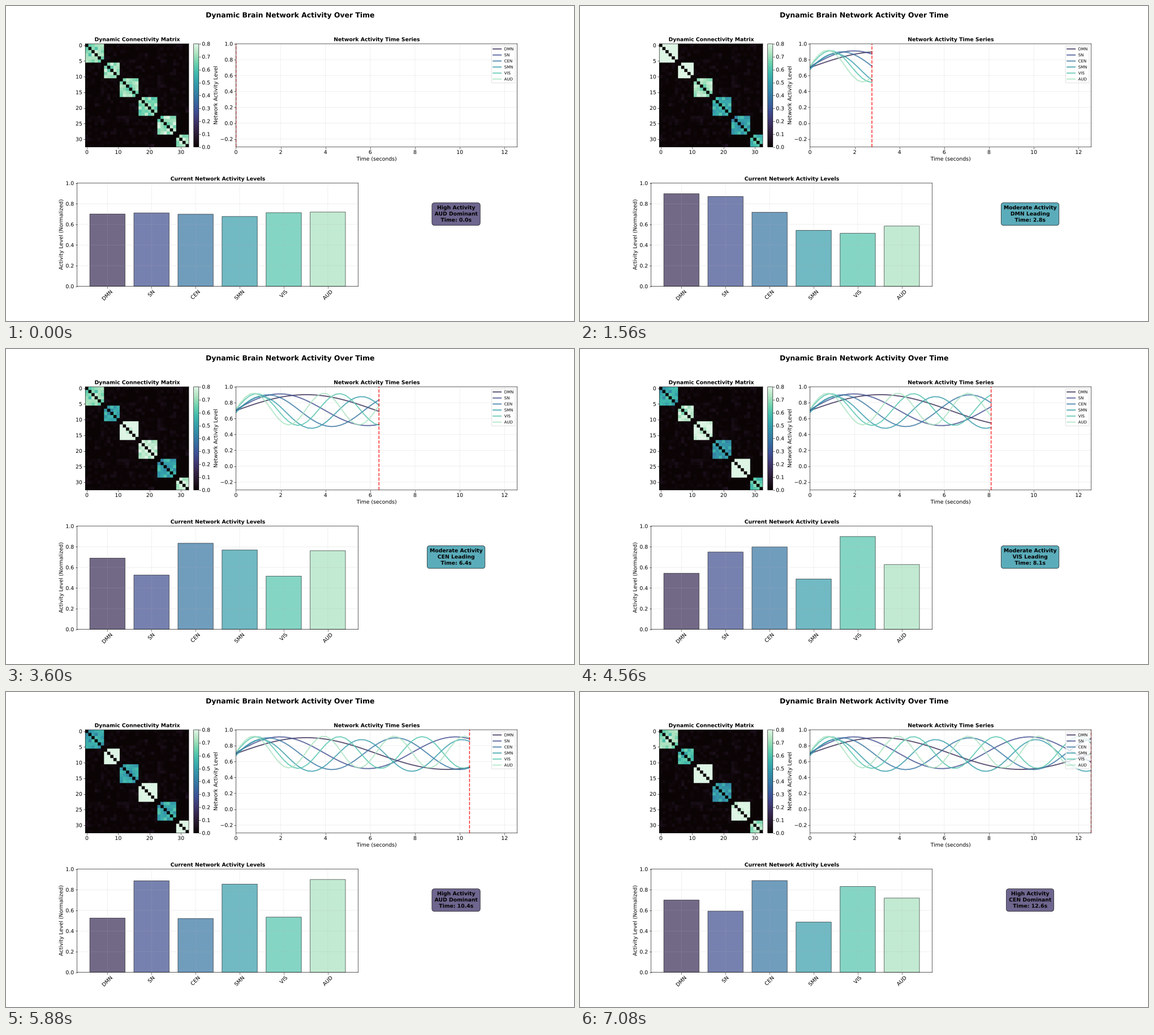
A matplotlib script that plays this animation: 1004x558 px, repeating every 7200 ms.

```python
import numpy as np
import matplotlib.pyplot as plt
from matplotlib.animation import FuncAnimation
from matplotlib.colors import LinearSegmentedColormap
from matplotlib.patheffects import Normal
from matplotlib.text import Text

FRAMES, INTERVAL = 60, 120
NAMES = ["DMN", "SN", "CEN", "SMN", "VIS", "AUD"]
SIZES = [6, 5, 6, 6, 6, 4]
MEANS = np.array([0.701, 0.711, 0.699, 0.677, 0.714, 0.720])
HIGH, MODERATE = "#6e668e", "#5bacba"
UPSAMPLE = np.ones((12, 12))

# Place edges and glyphs at fractions of a pixel.
plt.rcParams.update({"font.family": "DejaVu Sans", "font.size": 12,
                     "text.hinting": "none", "path.snap": False})
mako = LinearSegmentedColormap.from_list("mako", [
    "#0B0405", "#231526", "#35264C", "#403A75", "#3D5296", "#366DA0",
    "#3487A6", "#35A1AB", "#43BBAD", "#6CD3AD", "#ADE3C0", "#DEF5E5"])
colors = mako(np.linspace(0.2, 0.9, len(NAMES)))

# Network means oscillate, each one faster than the last.
t = np.linspace(0, 4 * np.pi, FRAMES)
waves = 0.2 * np.sin(np.outer(0.5 + 0.3 * np.arange(len(NAMES)), t))
activity = MEANS[:, None] + waves

# Symmetric matrix: faint background noise, strong blocks, empty diagonal.
rng = np.random.default_rng(42)
labels = np.repeat(np.arange(len(SIZES)), SIZES)
n = len(labels)


def symmetric(values):
    return (values + values.T) / 2


base = np.clip(symmetric(rng.normal(0, 0.03, (n, n))), 0, None)
strength = symmetric(rng.uniform(0.6, 0.8, (n, n)))
np.fill_diagonal(base, 0)
off_diagonal = ~np.eye(n, dtype=bool)
blocks = []
for k, mean in enumerate(MEANS):
    block = (labels[:, None] == k) & (labels == k) & off_diagonal
    base[block] = strength[block] - strength[block].mean() + mean
    blocks.append(block)


def matrix_at(frame):
    matrix = base.copy()
    for block, wave in zip(blocks, waves[:, frame]):
        matrix[block] += wave
    return np.kron(matrix, UPSAMPLE)


def set_title(ax, text):
    ax.set_title(text, fontsize=12, fontweight="bold")


fig = plt.figure(figsize=(17.9929, 10), dpi=55.8)
fig.suptitle("Dynamic Brain Network Activity Over Time", fontsize=16,
             fontweight="bold")
grid = fig.add_gridspec(2, 3, left=0.125, right=0.9, bottom=0.11, top=0.88,
                        hspace=0.35, wspace=0.3)

ax_matrix = fig.add_subplot(grid[0, 0])
image = ax_matrix.imshow(matrix_at(0), cmap=mako, vmin=0, vmax=0.8,
                         extent=(-0.5, n - 0.5, n - 0.5, -0.5),
                         interpolation="hanning", interpolation_stage="rgba")
ax_matrix.set_xticks(range(0, 31, 10))
ax_matrix.set_yticks(range(0, 31, 5))
set_title(ax_matrix, "Dynamic Connectivity Matrix")
fig.colorbar(image, ax=ax_matrix, fraction=0.046, pad=0.04,
             ticks=np.arange(9) / 10)

ax_series = fig.add_subplot(grid[0, 1:])
lines = [ax_series.plot([], [], color=c, lw=2.5, alpha=0.8, label=name)[0]
         for name, c in zip(NAMES, colors)]
cursor = ax_series.axvline(0, color="red", ls="--", lw=2, alpha=0.8)
ax_series.set(xlim=(0, t[-1]), ylim=(-0.3, 1), xlabel="Time (seconds)",
              ylabel="Network Activity Level", xticks=range(0, 13, 2),
              yticks=np.arange(-1, 6) / 5)
set_title(ax_series, "Network Activity Time Series")
ax_series.legend(loc="upper right", fontsize=9, labelspacing=0.56)
ax_series.grid(alpha=0.3)

ax_bars = fig.add_subplot(grid[1, :2])
bars = ax_bars.bar(NAMES, MEANS, color=colors, alpha=0.7, edgecolor="black",
                   linewidth=1)
ax_bars.set(ylim=(0, 1), ylabel="Activity Level (Normalized)")
ax_bars.tick_params(axis="x", rotation=45)
set_title(ax_bars, "Current Network Activity Levels")
ax_bars.grid(alpha=0.3)

ax_status = fig.add_subplot(grid[1, 2])
ax_status.axis("off")
status = ax_status.text(
    0.5, 0.7, "", transform=ax_status.transAxes, ha="center", va="center",
    fontsize=12, fontweight="bold", linespacing=1.32,
    bbox=dict(boxstyle="round,pad=0.5", facecolor=HIGH,
              edgecolor=(0, 0, 0, 0.8)))

# A path effect makes text render as smooth outlines.
for text in fig.findobj(Text):
    text.set_path_effects([Normal()])


def update(frame):
    levels = activity[:, frame]
    image.set_data(matrix_at(frame))
    for line, series in zip(lines, activity):
        line.set_data(t[:frame + 1], series[:frame + 1])
    cursor.set_xdata([t[frame]] * 2)
    for bar, level in zip(bars, levels):
        bar.set_height(level)

    high = levels.mean() > 0.7
    level_word, role = ("High", "Dominant") if high else ("Moderate", "Leading")
    leader = NAMES[levels.argmax()]
    status.set_text(f"{level_word} Activity\n{leader} {role}\n"
                    f"Time: {t[frame]:.1f}s")
    status.get_bbox_patch().set_facecolor(HIGH if high else MODERATE)
    return [image, *lines, cursor, *bars, status]


anim = FuncAnimation(fig, update, frames=FRAMES, interval=INTERVAL,
                     repeat=True, repeat_delay=0, blit=False)
plt.show()
```
